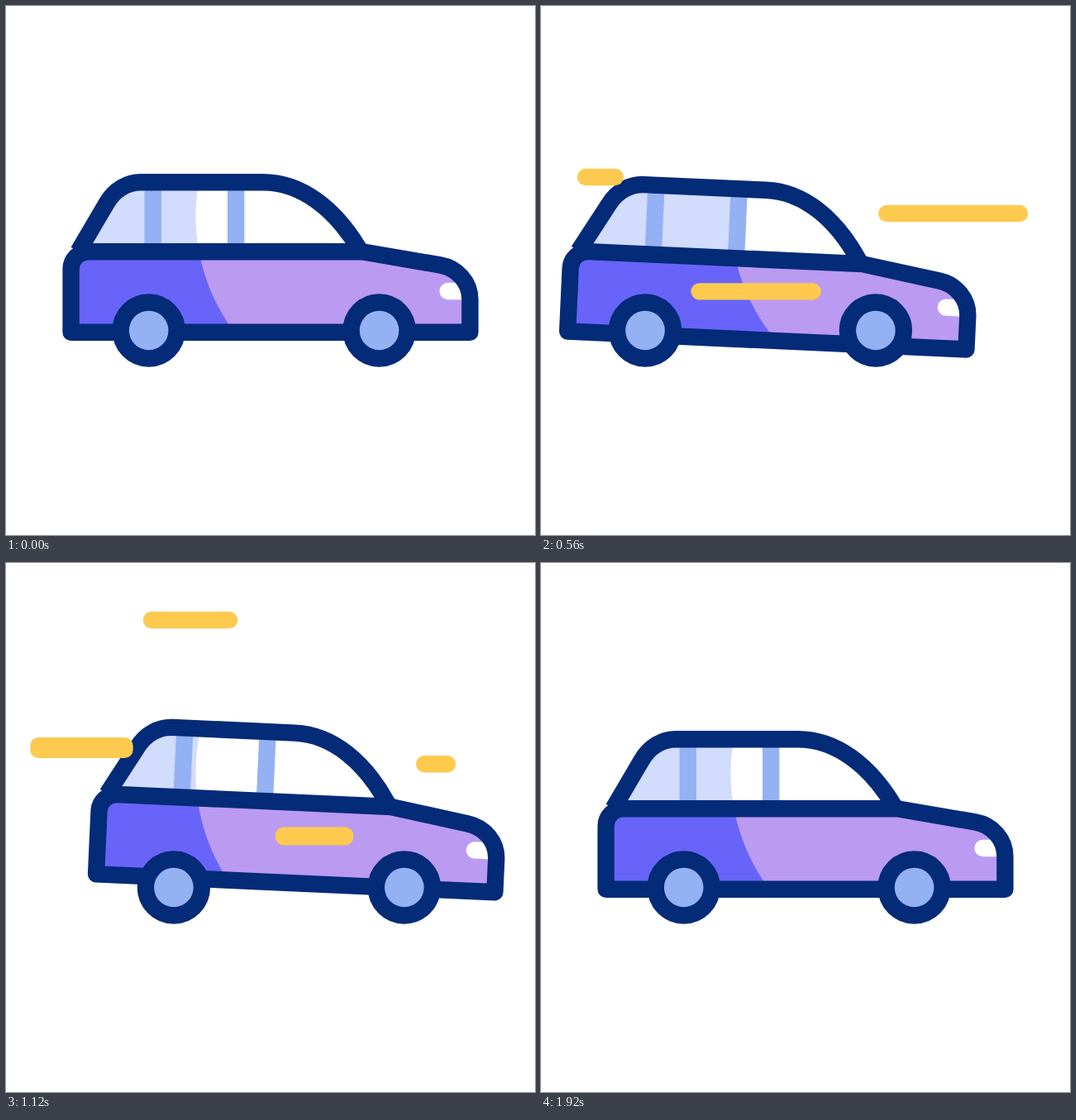
Write an HTML page that moves like this. It is 640x640 px and loops after 2000 ms.

```html
<!DOCTYPE html>
<html lang="en">
<head>
<meta charset="utf-8">
<title>Car</title>
<style>
  html, body { margin: 0; width: 100%; height: 100%; overflow: hidden; background: #fff; }
  svg { display: block; width: 100%; height: 100%; }
  .line { fill: none; stroke: #042b78; stroke-width: 20.4; stroke-linejoin: round; }
  .shade { --glass: #d2dcfd; --paint: #6964f9; }
  .light { --glass: #fff; --paint: #bb9af2; }
  .glass { fill: var(--glass); }
  .paint { fill: var(--paint); }
  .pillar { fill: #94b1f4; }
  .wheel { fill: #94b1f4; stroke: #042b78; stroke-width: 20.4; }
  #bars { fill: #fdca4f; }
</style>
</head>
<body>
<svg viewBox="0 0 640 640">
  <defs>
    <path id="cabin" d="M87.4 297 L121.5 239 C131 222 147 213.2 163 213.2 H311 C358 213.2 398 246 426 292 L430 297"/>
    <path id="hull" d="M78.6 394.7 V318 A21 21 0 0 1 99.6 297.2 H431 L525 313.4 C546 317 561.4 334 561.4 355 V394.7 Z"/>
    <g id="fills">
      <use href="#cabin" class="glass"/>
      <use href="#hull" class="paint"/>
    </g>
    <!-- The highlight edge stays put while the car moves under it -->
    <clipPath id="sheen"><circle cx="464.5" cy="254" r="235"/></clipPath>
  </defs>

  <g class="body"><use href="#fills" class="shade"/></g>
  <g clip-path="url(#sheen)">
    <g class="body"><use href="#fills" class="light"/></g>
  </g>
  <g class="body">
    <rect class="pillar" x="167.6" y="213" width="20.4" height="84"/>
    <rect class="pillar" x="268" y="213" width="20.4" height="84"/>
    <rect x="524.4" y="334.8" width="40" height="20.4" rx="10.2" fill="#fff"/>
    <use href="#cabin" class="line"/>
    <use href="#hull" class="line"/>
  </g>
  <g id="wheels">
    <circle class="wheel" cx="172.7" cy="392.5" r="34"/>
    <circle class="wheel" cx="451.6" cy="392.5" r="34"/>
  </g>
  <g id="bars"></g>
</svg>

<script>
const LOOP = 2000, STEP = 40, CAP = 10.2;

// Keys are [time, value] pairs, eased in and out between neighbours.
const shift = [[0, 0], [440, -58.5], [1000, 41.5], [1440, -20.2], [1920, 0]];
const lift = [[0, 0], [450, 9.8], [560, 9.8], [960, -8.5], [1000, -8.5], [1520, 0]];
const tilt = [[0, 0], [450, 2.6], [1180, 2.6], [1600, 0]];

// Each streak runs from x = from to x = to; head and tail are [start, end] times.
const streaks = [
  { y: 92,    h: 20.4, from: 555, to: 305, head: [0, 387],     tail: [170, 530] },
  { y: 207,   h: 20.4, from: 300, to: 54,  head: [0, 460],     tail: [53, 720] },
  { y: 345.4, h: 20.4, from: 394, to: 156, head: [182, 682],   tail: [360, 940] },
  { y: 251,   h: 20.4, from: 588, to: 340, head: [320, 704],   tail: [520, 870] },
  { y: 69,    h: 20.4, from: 420, to: 176, head: [720, 1120],  tail: [816, 1343] },
  { y: 223.5, h: 25,   from: 274, to: 28,  head: [720, 1180],  tail: [773, 1440] },
  { y: 330.5, h: 22,   from: 586, to: 336, head: [720, 1107],  tail: [890, 1250] },
  { y: 243.2, h: 20.4, from: 534, to: 286, head: [1040, 1424], tail: [1240, 1590] }
];

function ease(t, start, end) {
  const s = Math.min(1, Math.max(0, (t - start) / (end - start)));
  return s * s * (3 - 2 * s);
}

function track(keys, t) {
  let value = keys[0][1];
  for (let i = 1; i < keys.length; i++) {
    const [t0, v0] = keys[i - 1], [t1, v1] = keys[i];
    value += (v1 - v0) * ease(t, t0, t1);
  }
  return value;
}

const bodies = document.querySelectorAll(".body");
const wheels = document.getElementById("wheels");
const bars = document.getElementById("bars");

for (const s of streaks) {
  s.rect = document.createElementNS("http://www.w3.org/2000/svg", "rect");
  s.rect.setAttribute("y", s.y - s.h / 2);
  s.rect.setAttribute("height", s.h);
  s.rect.setAttribute("rx", CAP);
  bars.append(s.rect);
}

function drawStreak(s, t) {
  const span = s.to - s.from;
  const left = s.from + span * ease(t, ...s.head);
  const right = s.from + span * ease(t, ...s.tail);
  const visible = t > s.head[0] && t < s.tail[1];
  s.rect.setAttribute("x", left - CAP);
  s.rect.setAttribute("width", visible ? right - left + 2 * CAP : 0);
}

function draw(t) {
  const x = track(shift, t), y = track(lift, t), angle = track(tilt, t);
  for (const body of bodies) {
    body.setAttribute("transform", `translate(${x} ${y}) rotate(${angle} 320 394.7)`);
  }
  wheels.setAttribute("transform", `translate(${x} 0)`);
  for (const s of streaks) drawStreak(s, t);
}

function tick() {
  const t = performance.now() % LOOP;
  draw(Math.min(1920, Math.floor(t / STEP) * STEP));
  requestAnimationFrame(tick);
}
tick();
</script>
</body>
</html>
```
